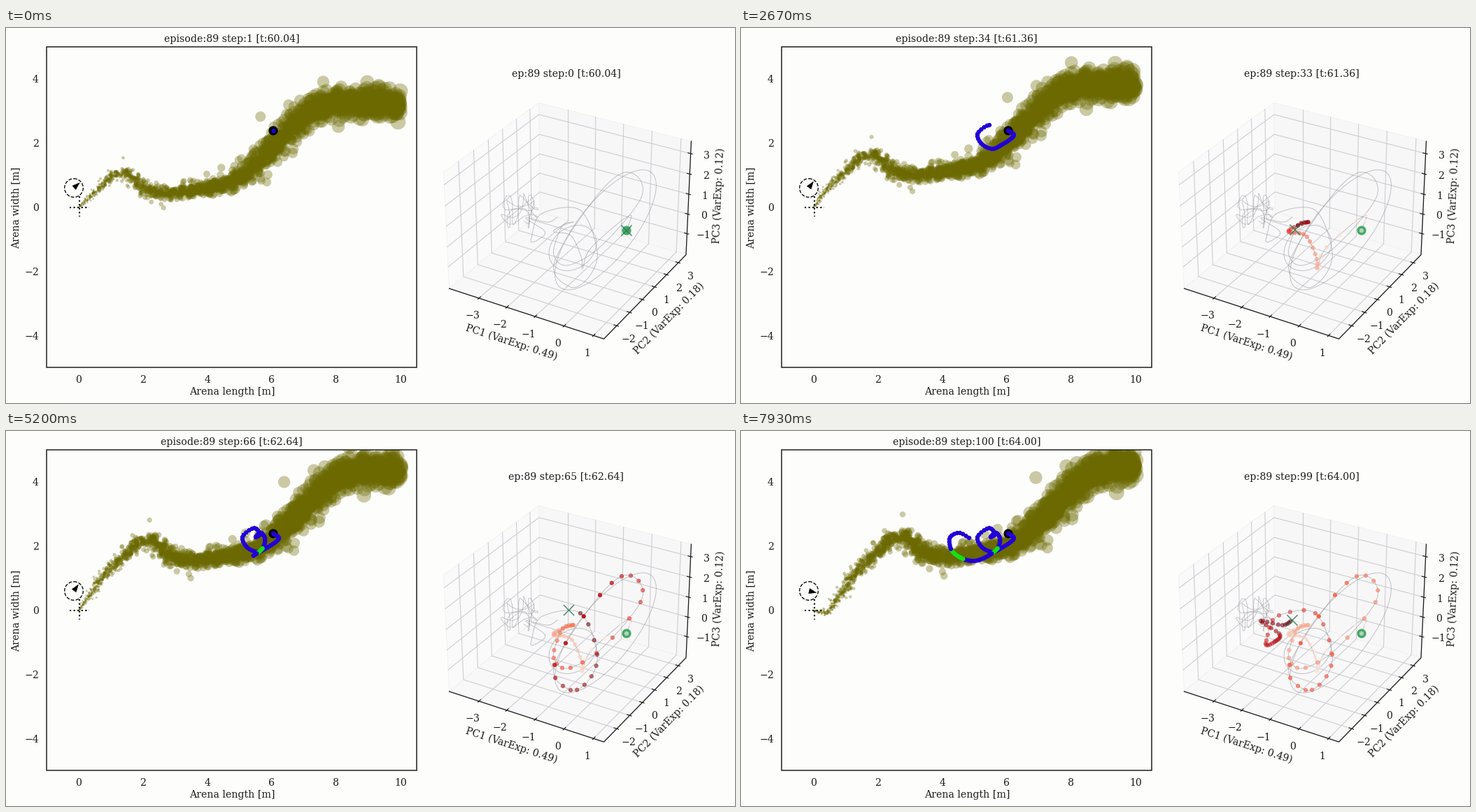
A matplotlib script for the animation above (8000 ms loop, 1042 px wide and 537 px high).

```python
import numpy as np
import matplotlib.pyplot as plt
from matplotlib.animation import FuncAnimation
from matplotlib.patches import Circle, Ellipse, Polygon, Rectangle

W, H, DPI = 1042, 537, 128
PT = 72 / DPI                      # points per pixel
STEPS, LOOP = 100, 8000
INK = "#1c1c1c"
FONT = 14.1 * PT

plt.rcParams["font.family"] = "DejaVu Serif"
fig = plt.figure(figsize=(W / DPI, H / DPI), dpi=DPI, facecolor="#fdfdfc")
ax = fig.add_axes([0, 0, 1, 1])
ax.set_xlim(0, W)
ax.set_ylim(H, 0)
ax.axis("off")


def label(x, y, s, rot=0, ha="center"):
    va = "center" if rot else "baseline"
    s = str(s).replace("-", "\u2212")
    return ax.text(x, y, s, rotation=rot, ha=ha, va=va, size=FONT, color=INK)


def line(pts, color, width, z, **kw):
    pts = np.asarray(pts)
    return ax.plot(pts[:, 0], pts[:, 1], color=color, lw=width * PT, zorder=z, **kw)[0]


def dots(z, radius=1.0, **kw):
    return ax.scatter([], [], s=(2 * radius * PT) ** 2, zorder=z, **kw)


def spline(keys, t):
    """Cubic Hermite curve through rows of (time, x, y)."""
    keys = np.array(keys, float)
    tk, p = keys[:, 0], keys[:, 1:]
    m = np.gradient(p, tk, axis=0)
    i = np.clip(np.searchsorted(tk, t, "right") - 1, 0, len(tk) - 2)
    h = (tk[i + 1] - tk[i])[:, None]
    u = (t - tk[i])[:, None] / h
    return ((2 * u**3 - 3 * u**2 + 1) * p[i] + (u**3 - 2 * u**2 + u) * h * m[i]
            + (3 * u**2 - 2 * u**3) * p[i + 1] + (u**3 - u**2) * h * m[i + 1])


# ---------- arena ----------
UNIT = 46
SOURCE = np.array([104.0, 257.0])
arena = Rectangle((58, 26.5), 529, 459.5, fill=False, ec=INK, lw=1.5 * PT, zorder=8)
ax.add_patch(arena)
for v in range(0, 11, 2):
    label(SOURCE[0] + UNIT * v, 507.5, v)
for v in range(-4, 5, 2):
    label(47, SOURCE[1] - UNIT * v + 5, v, ha="right")
label(323, 525, "Arena length [m]")
label(14.6, 257, "Arena width [m]", 90)
arena_title = label(322.5, 20, "")

# ---------- plume: puffs carried by one shared wind ----------
TURN = 77
WIND = np.array([[0.565, -0.79], [0.84, 0.2]])
rng = np.random.default_rng(7)


def drift(step):
    s = np.maximum(np.asarray(step, float), 0)[..., None]
    return np.minimum(s, TURN) * WIND[0] + np.maximum(s - TURN, 0) * WIND[1]


def start_line(dist):
    """Centre of the plume at the first step, by distance from the source."""
    knots = [(104, 257), (130, 233), (162, 207), (205, 233), (260, 233),
             (340, 211), (390, 163), (440, 116), (490, 107), (600, 114)]
    pts = spline([(x, x, y) for x, y in knots], np.linspace(104, 600, 300))
    run = np.r_[0, np.cumsum(np.hypot(*np.diff(pts, axis=0).T))]
    return np.c_[np.interp(dist, run, pts[:, 0]), np.interp(dist, run, pts[:, 1])]


born = np.arange(-575, STEPS, 0.3)
base = start_line(np.maximum(-born, 0) * 0.96)
spread = 0.36 * rng.standard_t(6, (len(born), 2))
plume = dots(2, facecolors=[(0.42, 0.41, 0.0, 0.35)], linewidths=0)
plume.set_clip_path(arena)


def draw_plume(step):
    live = born <= step
    age = step - born[live]
    pos = base[live] + drift(step) - drift(born[live]) + spread[live] * np.sqrt(age)[:, None]
    radius = 0.9 + 0.018 * age
    keep = pos[:, 0] <= SOURCE[0] + 10 * UNIT
    plume.set_offsets(pos[keep])
    plume.set_sizes((2 * radius[keep] * PT) ** 2)


# source cross and wind vane
line([(91, 257), (118.5, 257)], "black", 2.1, 4, ls=":")
line([(104.5, 241), (104.5, 270)], "black", 2.1, 4, ls=":")
VANE = np.array([97.0, 229.0])
ax.add_patch(Circle(VANE, 13.3, fill=False, ec="black", lw=1.3 * PT, ls="--", zorder=4))
arrow = ax.add_patch(Polygon([VANE] * 3, fc="black", ec="black", lw=0.5 * PT, zorder=5))


def draw_vane(step):
    d = WIND[int(step >= TURN)] if step else np.array([0.74, -0.67])
    d = d / np.hypot(*d)
    n = np.array([-d[1], d[0]])
    arrow.set_xy([VANE + 11 * d, VANE + 0.5 * d + 3.6 * n, VANE + 0.5 * d - 3.6 * n])


# ---------- walker ----------
steps = np.arange(STEPS)
walk = spline([
    (0, 382, 147), (5, 390, 153), (13, 373, 167), (19, 358, 173), (24, 343, 165),
    (28, 338, 152), (33, 355, 139), (37, 363, 147), (42, 357, 152), (49, 365, 146),
    (53, 370, 153), (58, 368, 166), (64, 356, 177), (73, 333, 186), (80, 315, 182),
    (88, 299, 166), (92, 299, 152), (96, 313, 146), (99, 326, 153)], steps)
in_plume = ((steps >= 59) & (steps < 63)) | ((steps >= 79) & (steps < 87))
walk_color = np.where(in_plume[:, None], [0.08, 0.88, 0.08], [0.13, 0.0, 0.84])
ax.add_patch(Circle(walk[0], 6.6, fc="black", ec="none", zorder=5))
trail = dots(6, 3.2, linewidths=0)

# ---------- 3D box ----------
BOX = np.array([1.1905, 1.1905, 0.8929])
RIGHT = np.array([0.866, 0.5, 0.0])
UP = np.array([-0.25, 0.433, 0.866])
EYE = np.array([0.433, -0.75, 0.5])


def project(pts):
    """Unit-cube points to pixels, seen from elevation 30, azimuth -60."""
    p = (np.asarray(pts, float) - 0.5) * BOX
    k = 2127 / (10 - p @ EYE)
    return np.c_[805.9 + k * (p @ RIGHT), 268 - k * (p @ UP)]


def pane(corners, shade):
    ax.add_patch(Polygon(project(corners), fc=str(shade), ec="#f0f0f0", lw=0.8 * PT, zorder=1))


pane([(0, 0, 0), (0, 1, 0), (0, 1, 1), (0, 0, 1)], 0.982)
pane([(0, 1, 0), (1, 1, 0), (1, 1, 1), (0, 1, 1)], 0.967)
pane([(0, 0, 0), (1, 0, 0), (1, 1, 0), (0, 1, 0)], 0.974)


def ticks(values, first, gap, path, out, shift):
    """Grid lines, tick marks and numbers; path maps a fraction to three points."""
    for i, v in enumerate(values):
        pts = np.array(path(first + gap * i), float)
        line(project(pts), "#cdcdd3", 1.1, 2)
        mark = pts[0] + np.outer([-0.0167, 0.0105], out)
        line(project(mark), INK, 1.2, 5)
        x, y = project(pts[:1])[0] + shift
        label(x, y + 5, v)


ticks(range(-3, 2), 0.2004, 0.184, lambda f: [(f, 0, 0), (f, 1, 0), (f, 1, 1)],
      (0, -1, 0), (-9.5, 24.5))
ticks(range(-2, 4), 0.1453, 0.1506, lambda f: [(1, f, 0), (0, f, 0), (0, f, 1)],
      (1, 0, 0), (17, 18.5))
ticks(range(-1, 4), 0.1928, 0.1758, lambda f: [(1, 1, f), (0, 1, f), (0, 0, f)],
      (1, 0, 0), (23, 2))
line(project([(0, 0, 0), (1, 0, 0), (1, 1, 0), (1, 1, 1)]), INK, 1.3, 5)
label(722, 450, "PC1 (VarExp: 0.49)", -18)
label(947.5, 416, "PC2 (VarExp: 0.18)", 45.7)
label(1019, 240, "PC3 (VarExp: 0.12)", 87.5)
state_title = label(801, 70, "")

# ---------- state path ----------
GREY = (0.55, 0.55, 0.6, 0.55)
state_keys = [
    (0, 887, 290), (2, 893, 268), (5, 837, 314), (8, 824, 344), (11, 823, 331),
    (15, 809, 299), (20, 783, 292), (28, 811, 278), (33, 792, 289), (36, 783, 325),
    (39, 807, 339), (41, 844, 318), (44, 907, 245), (48, 880, 208), (50, 849, 235),
    (53, 784, 335), (56, 807, 371), (61, 845, 320), (64, 821, 261), (67, 769, 264),
    (71, 751, 300), (78, 764, 301), (84, 769, 290), (89, 743, 272), (94, 774, 278),
    (99, 788, 271)]
state = spline(state_keys, steps)
line(spline(state_keys, np.linspace(0, STEPS - 1, 400)), GREY, 0.9, 3)
for centre, long, short, tilt in [((857, 289), 210, 80, -51.6), ((810, 315), 74, 58, -40)]:
    ax.add_patch(Ellipse(centre, long, short, angle=tilt, fill=False,
                         ec=GREY, lw=0.9 * PT, zorder=3))
t = np.linspace(0, 11, 75)
line(np.c_[734 + 20 * np.sin(1.9 * t) + 7 * np.sin(5.3 * t + 1),
           262 + 16 * np.sin(2.7 * t + 2) + 10 * np.sin(6.1 * t)], GREY, 0.8, 3)

ax.add_patch(Circle(state[0], 6.6, fc=(0.2, 0.63, 0.34, 0.9), ec="none", zorder=5))
history = dots(6, 2.7, linewidths=0.8 * PT)
cross = [line([(0, 0), (0, 0)], (0.18, 0.47, 0.33, 0.8), 1.6, 7) for _ in range(2)]
reds = plt.get_cmap("Reds")
near = 0.56 + 0.44 * np.exp(-((steps - 51) / 2.5) ** 2)   # opacity by depth


def draw_state(step):
    rgba = reds(steps[:step] / max(step - 1, 1))
    rgba[:, 3] = near[:step]
    history.set_offsets(state[:step].reshape(-1, 2))
    history.set_facecolor(rgba)
    history.set_edgecolor(rgba)
    x, y = state[step]
    for arm, dy in zip(cross, (7, -7)):
        arm.set_data([x - 7, x + 7], [y - dy, y + dy])


def update(step):
    clock = f"[t:{60.04 + 0.04 * step:.2f}]"
    arena_title.set_text(f"episode:89 step:{step + 1} {clock}")
    state_title.set_text(f"ep:89 step:{step} {clock}")
    draw_plume(step)
    draw_vane(step)
    trail.set_offsets(walk[:step + 1])
    trail.set_facecolor(walk_color[:step + 1])
    draw_state(step)
    return []


anim = FuncAnimation(fig, update, frames=STEPS, interval=LOOP // STEPS,
                     init_func=lambda: update(0), repeat=True, repeat_delay=0)
plt.show()
```
